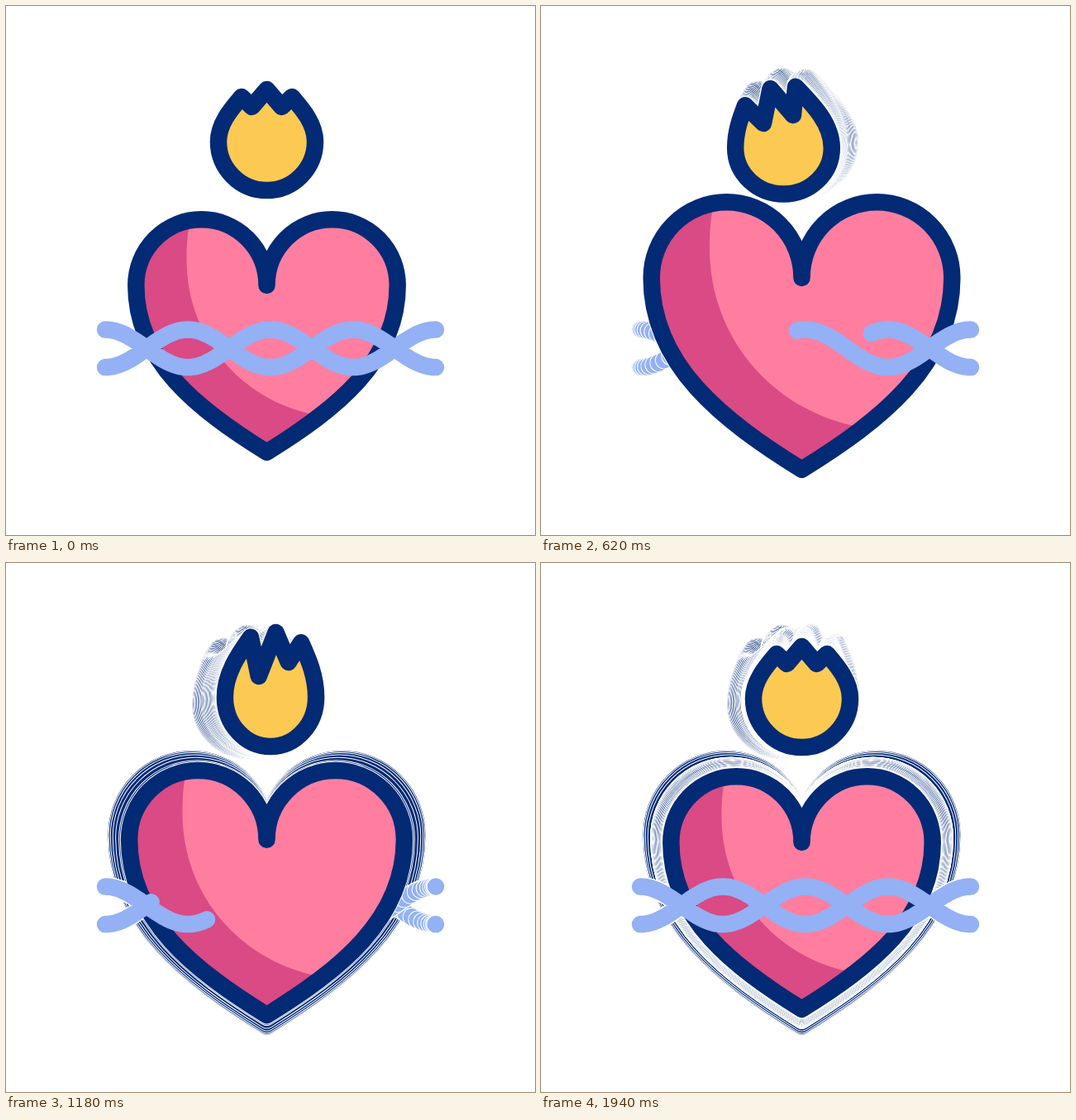
An HTML page with a canvas for the animation above (2.4 s loop, 640 by 640 pixels).

```html
<!DOCTYPE html>
<html lang="en">
<head>
<meta charset="utf-8">
<title>Beating heart</title>
<style>
  html, body { margin: 0; width: 100%; height: 100%; overflow: hidden; background: #fff; }
  canvas { display: block; width: 100%; height: 100%; }
</style>
</head>
<body>
<canvas id="stage" width="640" height="640"></canvas>
<script>
const LOOP = 2400, STEP = 20, LAST = 97, LINE = 20.5, HALO = 1, MID = 315.5;
const NAVY = '#032a75', PINK = '#ff7ea0', ROSE = '#da4a84', GOLD = '#fcca52', ROPE = '#93b1f4';

const ctx = document.getElementById('stage').getContext('2d');
ctx.lineCap = ctx.lineJoin = 'round';

const lerp = (a, b, u) => a + (b - a) * u;
const ease = u => (1 - Math.cos(Math.PI * Math.min(1, Math.max(0, u)))) / 2;
const span = (t, from, to) => ease((t - from) / (to - from));

// Heart, scaled around its middle while the line keeps its weight
const HEART = new Path2D('M315.5 338 A79.1 79.6 0 0 0 236.4 258.3 A79.1 79.6 0 0 0 157.3 338 ' +
  'C157.3 430 232 488 315.5 539.8 C399 488 473.7 430 473.7 338 ' +
  'A79.1 79.6 0 0 0 394.6 258.3 A79.1 79.6 0 0 0 315.5 338 Z');
const SHADE = new Path2D('M225 250 C220 268 218.5 286 218.5 307 C218.5 400 283 475 371 494 L315 560 L130 480 L130 250 Z');
const BEATS = [[0, 1], [320, .864], [640, 1.152], [960, .864], [1260, 1.089], [1600, 1]];

function beat(t) {
  const i = BEATS.findIndex(k => k[0] > t);
  if (i < 0) return 1;
  const [a, b] = [BEATS[i - 1], BEATS[i]];
  return lerp(a[1], b[1], span(t, a[0], b[0]));
}

function scaled(path, s) {
  const out = new Path2D();
  out.addPath(path, new DOMMatrix([s, 0, 0, s, MID * (1 - s), 399 * (1 - s)]));
  return out;
}

// Flame: time, body drift, tip lean, tip lift, depth of left and right notch
const FLICKER = [
  [0, 0, 0, 0, 0, 0],
  [300, -11, -24, 16, 20, -6],
  [620, -22, -38, 1, 20, 10],
  [840, -9, -22, -2, 12, 3],
  [1180, 4.5, 11, 17, 15, -2],
  [1460, -6, 3, 12, 9, 13],
  [1940, 0, 0, 0, 0, 0]
];

// Smooth curve through the keys, at rest at both ends
function flicker(t) {
  const j = FLICKER.findIndex(k => k[0] > t);
  if (j < 0) return FLICKER[0].slice(1);
  const slope = (i, n) => {
    const a = FLICKER[i - 1], b = FLICKER[i + 1];
    return a && b ? (b[n] - a[n]) / (b[0] - a[0]) : 0;
  };
  const a = FLICKER[j - 1], b = FLICKER[j];
  const d = b[0] - a[0], u = (t - a[0]) / d, v = 1 - u;
  return a.map((from, n) =>
    from * v * v * (1 + 2 * u) + b[n] * u * u * (1 + 2 * v) +
    d * u * v * (slope(j - 1, n) * v - slope(j, n) * u)).slice(1);
}

function flame(t) {
  const [drift, lean, lift, left, right] = flicker(t);
  const tip = side => [MID + side * 30.5 + lean, 101 + 9 * Math.abs(side) - lift + .3 * lean * side];
  const notch = (side, depth) => [MID + side * 18 + .75 * lean, 122 + depth];
  const cx = MID + drift, cy = 164 - .35 * drift, base = 223 - .2 * drift;
  const r = 58.5 - .2 * lift, k = .55;
  const [lx, ly] = tip(-1), [rx, ry] = tip(1), ex = cx + r, wx = cx - r;
  const p = new Path2D();
  p.moveTo(lx, ly);
  p.lineTo(...notch(-1, left));
  p.lineTo(...tip(0));
  p.lineTo(...notch(1, right));
  p.lineTo(rx, ry);
  p.bezierCurveTo(lerp(rx, ex, .46), lerp(ry, cy, .28), ex, lerp(ry, cy, .6), ex, cy);
  p.bezierCurveTo(ex, lerp(cy, base, k), cx + r * k, base, cx, base);
  p.bezierCurveTo(cx - r * k, base, wx, lerp(cy, base, k), wx, cy);
  p.bezierCurveTo(wx, lerp(ly, cy, .6), lerp(lx, wx, .46), lerp(ly, cy, .28), lx, ly);
  p.closePath();
  return p;
}

// Rope: two opposed waves that leave to the right and grow back from the left
const STRANDS = [
  { side: -1, out: [160, 1110], back: [830, 1765] },
  { side: 1, out: [40, 960], back: [955, 1880] }
];

function wave(path, side, from, to) {
  const n = Math.max(1, Math.ceil((to - from) * 100));
  for (let i = 0; i <= n; i++) {
    const f = lerp(from, to, i / n);
    const x = 120 + 400 * f, y = 414.3 + side * 22.8 * Math.cos(f * 4 * Math.PI);
    i ? path.lineTo(x, y) : path.moveTo(x, y);
  }
}

function rope(t) {
  const p = new Path2D();
  for (const { side, out, back } of STRANDS) {
    if (t < out[1]) wave(p, side, span(t, ...out), 1);
    if (t >= back[0]) wave(p, side, 0, Math.max(.0001, span(t, ...back)));
  }
  return p;
}

function stroke(path, color, width = LINE) {
  ctx.lineWidth = width;
  ctx.strokeStyle = color;
  ctx.stroke(path);
}

function fill(path, color) {
  ctx.fillStyle = color;
  ctx.fill(path);
}

// Paints over the last picture; pale halos cut the remains into thin contours
function draw(t) {
  const s = beat(t), heart = scaled(HEART, s), fire = flame(t), cord = rope(t);
  for (const path of [heart, fire, cord]) stroke(path, '#fff', LINE + 2 * HALO);
  fill(heart, PINK);
  ctx.save();
  ctx.clip(heart);
  fill(scaled(SHADE, s), ROSE);
  ctx.restore();
  stroke(heart, NAVY);
  fill(fire, GOLD);
  stroke(fire, NAVY);
  stroke(cord, ROPE);
}

let shown = -1;

function show(step) {
  if (step < shown) shown = -1;
  if (shown < 0) {
    ctx.fillStyle = '#fff';
    ctx.fillRect(0, 0, 640, 640);
  }
  while (shown < step) draw(STEP * ++shown);
}

const start = performance.now();
function tick() {
  const t = Math.max(0, performance.now() - start) % LOOP;
  show(Math.min(LAST, Math.floor(t / STEP)));
  requestAnimationFrame(tick);
}
tick();
</script>
</body>
</html>
```
